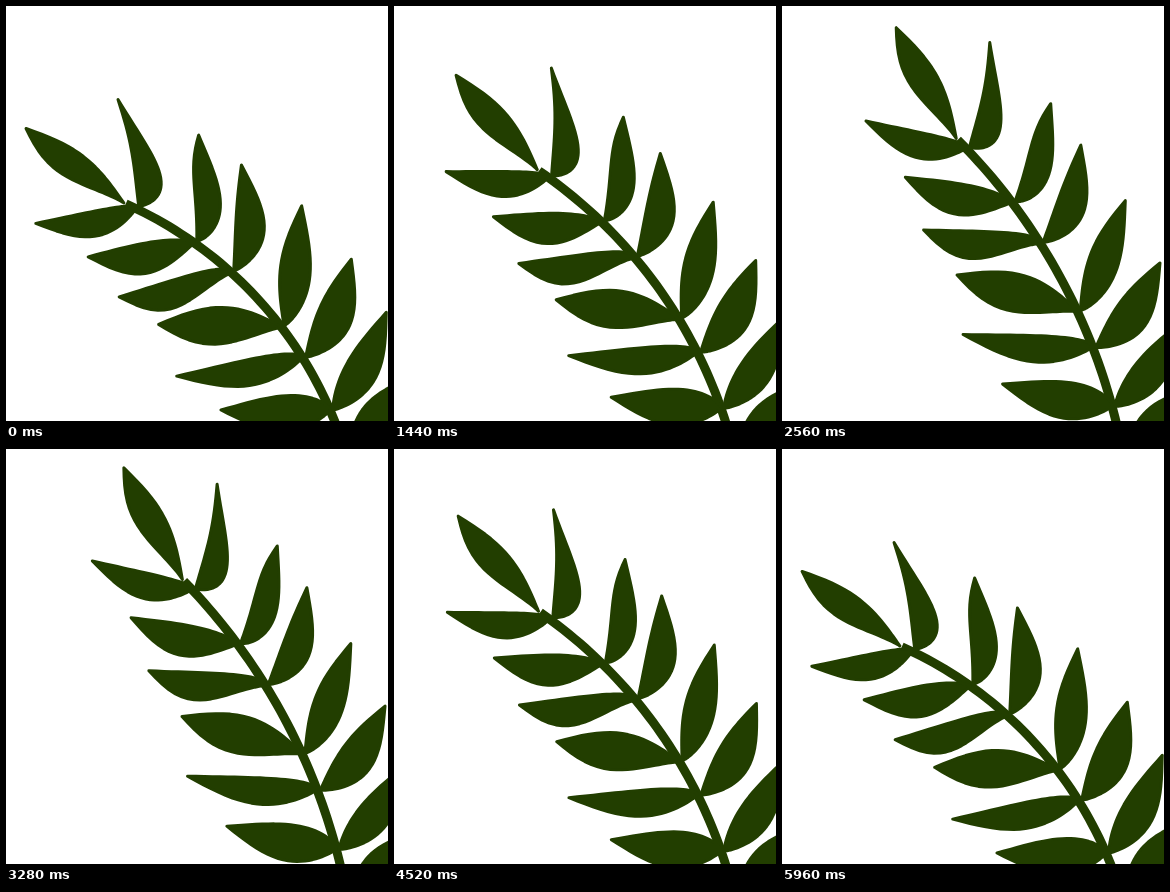
Write an HTML page with a canvas that moves like this. It is 382 by 415 pixels and loops after 6 s.

```html
<!DOCTYPE html>
<html lang="en">
<head>
<meta charset="utf-8">
<title>Swaying branch</title>
<style>
  html, body { margin: 0; width: 100%; height: 100%; overflow: hidden; background: #fff; }
  canvas { display: block; }
</style>
</head>
<body>
<canvas id="stage" width="382" height="415"></canvas>
<script>
const ctx = document.getElementById('stage').getContext('2d');
const LOOP = 6000, STEP = 40, GREEN = '#223e00';
const RAD = Math.PI / 180;
const { sin, cos, PI } = Math;

// Sway adds to each part's turn in proportion to its distance s along the stem.
const SWAY_PER_PX = 0.0454;
const LEFT = { turn: 12, grow: 0.025, offset: 0 };
const RIGHT = { turn: 10.3, grow: -0.02, offset: 3 };

// One edge of a leaf: how far it bulges, and where along the leaf it is widest.
const edge = (bulge, peak) => {
  const e = Math.log(0.5) / Math.log(peak);
  return u => bulge * sin(PI * u ** e);
};

// Lean is in degrees left of straight up; "over" is the edge right of the heading.
const leaf = (side, s, lean, len, over, under) => ({ side, s, lean, len, over, under });

const leaves = [
  leaf(LEFT, 299, 52.7, 123, edge(12.5, 0.5), edge(14.5, 0.6)),
  leaf(LEFT, 286, 98.5, 101, edge(4, 0.2), edge(21.5, 0.44)),
  leaf(LEFT, 218, 97.5, 107, edge(6.5, 0.35), edge(24, 0.5)),
  leaf(LEFT, 170, 102, 115, edge(7, 0.22), edge(22.5, 0.6)),
  leaf(LEFT, 96, 88.6, 123, edge(18.5, 0.48), edge(18.5, 0.57)),
  leaf(LEFT, 59.5, 98.5, 127, edge(6.5, 0.25), edge(20, 0.44)),
  leaf(LEFT, 0, 90, 109, edge(14.5, 0.35), edge(21, 0.43)),
  leaf(RIGHT, 284, 11, 109, edge(27, 0.23), edge(-3.5, 0.55)),
  leaf(RIGHT, 217, -1, 106, edge(23, 0.34), edge(4.5, 0.7)),
  leaf(RIGHT, 170, -4.2, 106, edge(27.5, 0.4), edge(1.5, 0.6)),
  leaf(RIGHT, 96, -8.4, 121, edge(18.5, 0.4), edge(12, 0.5)),
  leaf(RIGHT, 58, -25, 108, edge(26.5, 0.43), edge(8, 0.5)),
  leaf(RIGHT, -1, -28.6, 111, edge(22, 0.43), edge(10, 0.42)),
  leaf(RIGHT, -49, -40.5, 106, edge(18, 0.5), edge(20, 0.45))
];

// The stem is a circular arc that straightens and stretches as k goes from 0 to 1.
function stemAt(s, k) {
  const bend = (0.143 - SWAY_PER_PX * k) * RAD;
  const h0 = (23.5 - 8.7 * k) * RAD, h = h0 + bend * s;
  const r = (1 + 0.05 * k) / bend;
  return {
    x: 324 + 6.3 * k + r * (cos(h) - cos(h0)),
    y: 404 - 4.2 * k + r * (sin(h0) - sin(h)),
    h
  };
}

function drawStem(k) {
  ctx.beginPath();
  for (let s = -60; s <= 297; s += 7) {
    const p = stemAt(s, k);
    ctx.lineTo(p.x, p.y);
  }
  ctx.lineWidth = 9;
  ctx.stroke();
}

function drawLeaf({ side, s, lean, len, over, under }, k) {
  const root = stemAt(s, k);
  const x = root.x + side.offset * cos(root.h);
  const y = root.y - side.offset * sin(root.h);
  const a = (lean - k * (side.turn + SWAY_PER_PX * s)) * RAD;
  const size = 1 + side.grow * k, n = 30;
  ctx.beginPath();
  for (let i = -n; i <= n; i++) {
    // points crowd towards the base, where the outline turns fastest
    const u = (1 - Math.abs(i) / n) ** 2;
    const v = size * (i < 0 ? over(u) : -under(u)), d = size * len * u;
    // both edges run between the base and the tip
    ctx.lineTo(x - d * sin(a) + v * cos(a), y - d * cos(a) - v * sin(a));
    if (i === 0) ctx.lineTo(x - size * len * sin(a), y - size * len * cos(a));
  }
  ctx.closePath();
  ctx.lineWidth = 3;
  ctx.fill();
  ctx.stroke();
}

function draw(ms) {
  const t = Math.floor(ms % LOOP / STEP) * STEP;
  const k = (1 - cos(2 * PI * t / LOOP)) / 2;
  ctx.fillStyle = '#fff';
  ctx.fillRect(0, 0, 382, 415);
  ctx.fillStyle = ctx.strokeStyle = GREEN;
  ctx.lineJoin = 'round';
  drawStem(k);
  leaves.forEach(l => drawLeaf(l, k));
}

const start = performance.now();
function tick() {
  draw(performance.now() - start);
  requestAnimationFrame(tick);
}
tick();
</script>
</body>
</html>
```
